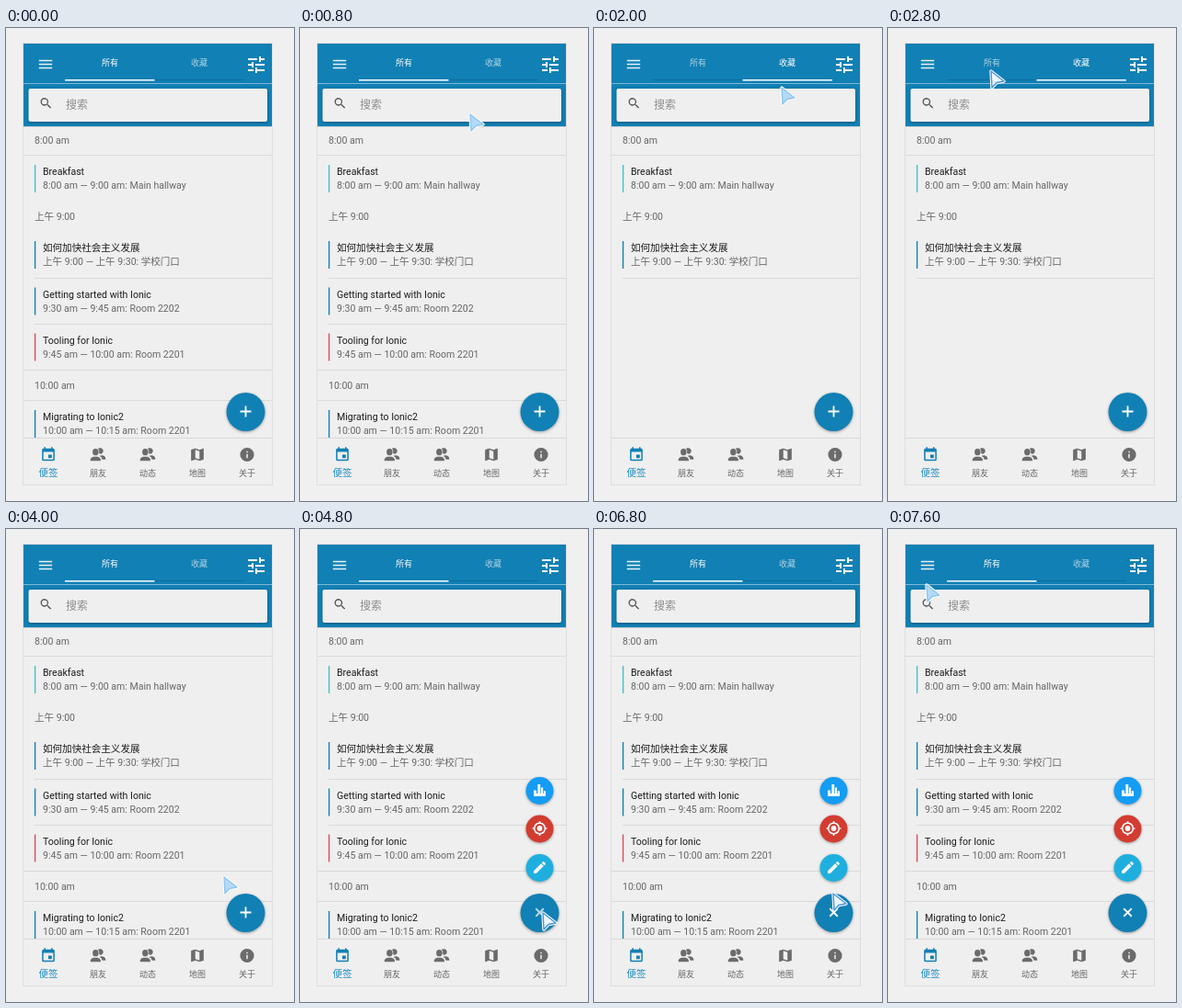
Recreate the animation shown at these times as an HTML page. Size 313x515 px, loop 8 s.

```html
<!DOCTYPE html>
<html lang="zh-CN">
<head>
<meta charset="utf-8">
<style>
html, body { margin: 0; height: 100%; overflow: hidden; background: #f0f0f0; }
svg { display: block; width: 100vw; height: 100vh; }
text { font: 10.55px Roboto, "Noto Sans CJK SC", "Noto Sans CJK", sans-serif; fill: #666; }
.title { fill: #1c1c1c; }
.small { font-size: 9px; text-anchor: middle; }
.shadow { filter: drop-shadow(0 1.5px 1.5px rgba(0, 0, 0, .35)); }
</style>
</head>
<body>
<svg viewBox="0 0 313 515">
  <rect x="18.5" y="16.5" width="271" height="481" fill="#efefef" stroke="#dedede"/>
  <clipPath id="view"><rect x="19" y="107" width="270" height="339"/></clipPath>
  <g clip-path="url(#view)"><g id="list"></g><g id="more"></g></g>
  <rect id="scroll" x="285" y="109" width="3" height="79" fill="#000" opacity=".2"/>

  <path d="M19 17H289V107H19z" fill="#1180b4"/>
  <path d="M19 107.5H289" stroke="#c9d3d8"/>
  <clipPath id="bar"><rect x="19" y="17" width="270" height="43"/></clipPath>
  <circle id="ripple" cx="204" cy="49" r="31" fill="#2571a2" clip-path="url(#bar)"/>
  <path d="M19 60.5H289" stroke="#7db8d4"/>
  <path d="M64 56.5H259" stroke="#0c6c9c"/>
  <rect id="line" y="56" width="97.5" height="1.5" fill="#fff"/>
  <text class="small tab" x="113" y="41.3">所有</text>
  <text class="small tab" x="210" y="41.3">收藏</text>
  <rect class="shadow" x="24.5" y="66" width="259.5" height="36" rx="2" fill="#efefef"/>
  <text x="65" y="88.3" style="font-size:12px;fill:#8c8c8c">搜索</text>

  <path d="M19 446.5H289" stroke="#d8d8d8"/>
  <g id="icons"></g>
  <g id="labels"></g>

  <g id="fabs"></g>
  <circle class="shadow" cx="260.5" cy="418" r="21" fill="#1180b4"/>
  <path id="plus" d="M-6 0H6M0 -6V6" stroke="#fff" stroke-width="1.8"/>

  <g id="cursor" stroke-linejoin="round">
    <path d="M2 2L3 20L8 14.5L16 13z" fill="none" stroke="#fff" stroke-width="3.4"/>
    <path id="arrow" d="M2 2L3 20L8 14.5L16 13z" stroke-width="1.4"/>
  </g>
</svg>
<script>
const $ = id => document.getElementById(id);
const add = (id, markup) => $(id).insertAdjacentHTML('beforeend', markup);

const glyphs = {
  menu: 'M3 18h18v-2H3zm0-5h18v-2H3zm0-7v2h18V6z',
  tune: 'M3 17v2h6v-2zM3 5v2h10V5zm10 16v-2h8v-2h-8v-2h-2v6zM7 9v2H3v2h4v2h2V9zm14 4v-2H11v2zm-6-4h2V7h4V5h-4V3h-2z',
  search: 'M15.5 14h-.8l-.3-.3A6.5 6.5 0 1 0 13.7 14.4l.3.3v.8l5 5L20.5 19zm-6 0a4.5 4.5 0 1 1 0-9 4.5 4.5 0 0 1 0 9z',
  event: 'M17 12h-5v5h5zM16 1v2H8V1H6v2H5a2 2 0 0 0-2 2V19a2 2 0 0 0 2 2h14a2 2 0 0 0 2-2V5a2 2 0 0 0-2-2h-1V1zm3 18H5V8h14z',
  people: 'M8.5 3.5a4.3 4.8 0 1 0 0 9.6a4.3 4.8 0 0 0 0-9.6zM1 21c0-4 2-5.500 5-6h5c3 .5 5 2 5 6zM15 2.500c-1.500 0-2.300.4-3 1q2.500 2 1.500 6.500q1.500 1.300 3 1c5-2 3.500-8.500-1.500-8.500zM14 13.500q4 2 4 5.500h5c0-4-2-5.500-5-6z',
  map: 'M20.5 3L15 5.100 9 3 3.400 4.900Q3 5 3 5.400V20.500Q3 21 3.600 21L9 18.900l6 2.100 5.600-1.900Q21 19 21 18.600V3.500Q21 3 20.500 3zM15 19l-6-2.100V5l6 2.100z',
  info: 'M12 2a10 10 0 1 0 0 20a10 10 0 0 0 0-20zm1 15h-2v-6h2zm0-8h-2V7h2z',
  stats: 'M3 21V12h4v5h2V3h4v14h1V8h3v9h1v-4h3v8z',
  locate: 'M12 8a4 4 0 1 0 0 8 4 4 0 0 0 0-8zm9 3A9 9 0 0 0 13 3V1h-2v2A9 9 0 0 0 3 11H1v2h2A9 9 0 0 0 11 21V23h2v-2A9 9 0 0 0 21 13H23v-2zM12 19a7 7 0 1 1 0-14 7 7 0 0 1 0 14z',
  edit: 'M3 17.2V21h3.800L17.800 9.900l-3.700-3.700zM20.700 7a1 1 0 0 0 0-1.400l-2.300-2.300a1 1 0 0 0-1.400 0l-1.900 1.800 3.800 3.800z'
};
const icon = (name, x, y, size, fill) =>
  `<path d="${glyphs[name]}" fill="${fill}" fill-rule="evenodd" transform="translate(${x} ${y}) scale(${size}) translate(-12 -12)"/>`;

const heading = (id, y, label) => add(id, `<text x="31" y="${y}">${label}</text>`);
const rule = (id, x, y) => add(id, `<path d="M${x} ${y}.5H289" stroke="#dadada"/>`);
const session = (id, y, color, title, detail) => add(id,
  `<path d="M31.6 ${y}v30" stroke="${color}" stroke-width="1.4"/>
   <text class="title" x="40" y="${y + 11.3}">${title}</text>
   <text x="40" y="${y + 26}">${detail}</text>`);

const blue = '#1180b4';
heading('list', 126, '8:00 am');
rule('list', 19, 138);
session('list', 149, '#45bfc6', 'Breakfast', '8:00 am — 9:00 am: Main hallway');
heading('list', 209, '上午 9:00');
session('list', 232, blue, '如何加快社会主义发展', '上午 9:00 — 上午 9:30: 学校门口');
rule('list', 31, 272);
session('more', 282.500, blue, 'Getting started with Ionic', '9:30 am — 9:45 am: Room 2202');
rule('more', 31, 322);
session('more', 332.500, '#dc4b55', 'Tooling for Ionic', '9:45 am — 10:00 am: Room 2201');
rule('more', 19, 372);
heading('more', 393, '10:00 am');
rule('more', 19, 405);
session('more', 416, blue, 'Migrating to Ionic2', '10:00 am — 10:15 am: Room 2201');

add('icons', icon('menu', 43, 39.5, .8, '#e6f2f8') + icon('tune', 272, 40, 1, '#fff') +
  icon('search', 43.5, 82, .66, '#555'));
[['event', '便签'], ['people', '朋友'], ['people', '动态'], ['map', '地图'], ['info', '关于']]
  .forEach(([name, label], i) => {
    const x = 46 + 54 * i;
    add('icons', icon(name, x, 464.5, .76, i ? '#6b6b6b' : blue));
    add('labels', `<text class="small" x="${x}" y="${i ? 487.5 : 488}"
      style="${i ? '' : 'font-size:10.5px;font-weight:500;fill:#1b8cc2'}">${label}</text>`);
  });
[['stats', 285, '#159cf3'], ['locate', 326.5, '#d33c31'], ['edit', 369, '#1fafdf']]
  .forEach(([name, y, color]) => add('fabs',
    `<circle class="shadow" cx="260.5" cy="${y}" r="15" fill="${color}"/>` +
    icon(name, 260.5, y - .5, .72, '#fff')));

// Pointer tip for every 400 ms step; the first step has no pointer.
const stops = [null, [178, 140], [183, 92], [201, 48], [202, 45], [202, 63], [126, 57],
  [110, 45], [127, 100], [127, 100], [235, 377], [263, 416], [262, 416], [262, 416],
  [263, 417], [262, 411], [259, 397], [258, 395], [256, 380], [40, 59]];
const tabs = document.querySelectorAll('.tab');
const show = (id, on) => $(id).style.display = on ? '' : 'none';

function draw(now) {
  const step = Math.floor(now % 8000 / 400);
  const starred = step >= 4 && step < 8;
  const open = step >= 12;
  const firm = step === 4 || step === 7 || step >= 11 && step <= 17;

  show('more', step < 5 || step > 7);
  show('ripple', step === 4);
  show('scroll', step === 8 || step === 9);
  show('fabs', open);
  $('line').setAttribute('x', starred ? 161.5 : 64);
  tabs.forEach((tab, i) => {
    const on = i === +starred;
    tab.style.fill = on ? '#fff' : '#b0d4e5';
    tab.style.fontWeight = on ? 500 : 400;
  });
  $('plus').setAttribute('transform', 'translate(260.5 417.5)' + (open ? ' rotate(45)' : ''));
  $('plus').setAttribute('opacity', step === 12 ? .7 : 1);

  const tip = stops[step];
  show('cursor', tip);
  if (tip) $('cursor').setAttribute('transform', `translate(${tip})`);
  $('arrow').setAttribute('fill', firm ? '#edf6ff' : '#b4dafa');
  $('arrow').setAttribute('stroke', firm ? '#4a94dc' : '#8fc6ee');
  requestAnimationFrame(draw);
}
const start = performance.now();
requestAnimationFrame(function first() {
  const tick = draw;
  draw = () => tick(Math.max(0, performance.now() - start));
  draw();
});
</script>
</body>
</html>
```
